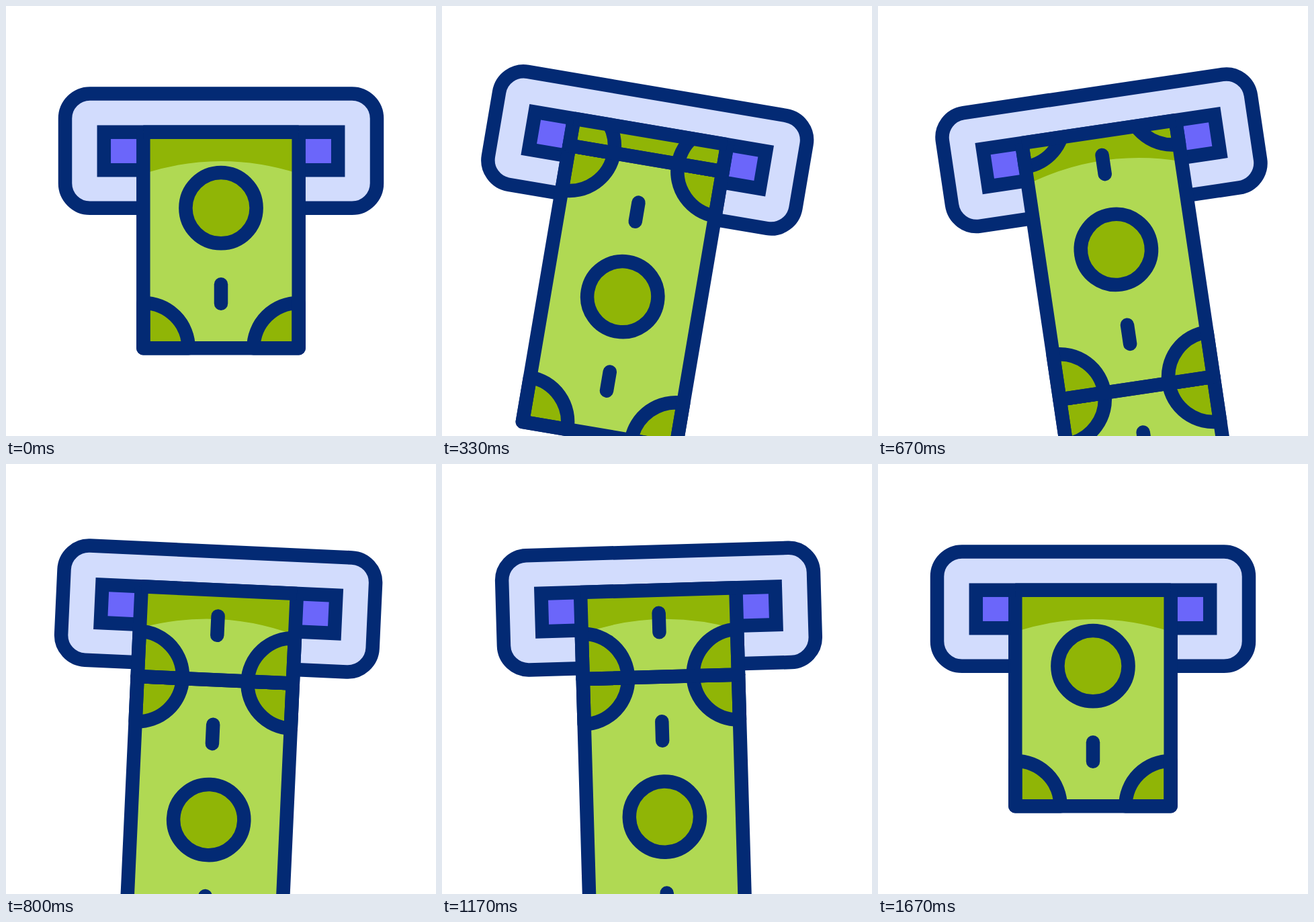
These frames come from a looping animation (640 px wide and 640 px high, 2 s). An HTML page:

```html
<!DOCTYPE html>
<html lang="en">
<head>
<meta charset="utf-8">
<title>Cash dispenser</title>
<style>
  html, body { margin: 0; width: 100%; height: 100%; overflow: hidden; background: #fff; }
  svg { display: block; width: 100vw; height: 100vh; }
  .line { stroke: #032a74; stroke-width: 20.5; stroke-linejoin: round; stroke-linecap: round; }
  .dark { fill: #90b506; }
</style>
</head>
<body>
<svg viewBox="0 0 640 640">
  <defs>
    <clipPath id="mouth"><rect x="180" y="187.5" width="280" height="2000"/></clipPath>
    <path id="corner" d="M-115.7 -67.3 A67.3 67.3 0 0 1 -48.4 0 H-115.7 Z"/>
    <!-- lower half of a bill, its bottom edge on y = 0 -->
    <g id="half" class="line dark">
      <use href="#corner"/>
      <use href="#corner" transform="scale(-1 1)"/>
      <path d="M0 -95 V-66.5"/>
    </g>
    <g id="bill">
      <use href="#half"/>
      <use href="#half" transform="translate(0 -417) scale(1 -1)"/>
      <circle class="line dark" cy="-208.5" r="52.6"/>
      <rect class="line" x="-115.7" y="-417" width="231.4" height="417" fill="none"/>
    </g>
  </defs>
  <g id="machine">
    <rect class="line" x="88" y="130.5" width="464" height="170.3" rx="37" fill="#d2dcfd"/>
    <rect class="line" x="145.8" y="187.7" width="348.4" height="56.5" fill="#6b66fa" style="stroke-linejoin: miter"/>
    <g clip-path="url(#mouth)">
      <rect id="paper" x="204.3" y="187.5" width="231.4" fill="#b0d953"/>
      <path class="dark" d="M204.3 187.5 H435.7 V249.5 Q320 212.5 204.3 249.5 Z"/>
      <g id="strip"></g>
    </g>
    <path class="line" d="M204.3 187.7 H435.7" style="stroke-linecap: butt"/>
  </g>
</svg>
<script>
  const byId = id => document.getElementById(id);
  const machine = byId('machine'), paper = byId('paper'), strip = byId('strip');

  const FPS = 30, LOOP = 2000, RESET = 50;
  const BILL = 417, BILLS = 4, REST = 509.2;
  const FEED_FRAMES = 47;
  // [frame, degrees]
  const SWING = [[0, 0], [9, 10], [19, -9], [26, 5], [33, -2], [40, 0]];

  for (let i = 0; i < BILLS; i++) {
    const bill = document.createElementNS('http://www.w3.org/2000/svg', 'use');
    bill.setAttribute('href', '#bill');
    bill.setAttribute('y', -i * BILL);
    strip.append(bill);
  }

  // cubic-bezier(a, 0, 1 - a, 1)
  function ease(x, a) {
    if (x <= 0) return 0;
    if (x >= 1) return 1;
    let lo = 0, hi = 1, s;
    for (let i = 0; i < 24; i++) {
      s = (lo + hi) / 2;
      const at = 3 * (1 - s) * s * ((1 - s) * a + s * (1 - a)) + s ** 3;
      if (at < x) lo = s; else hi = s;
    }
    return s * s * (3 - 2 * s);
  }

  function swing(frame) {
    const next = SWING.findIndex(key => key[0] > frame);
    if (next < 0) return 0;
    const [f0, from] = SWING[next - 1], [f1, to] = SWING[next];
    return from + (to - from) * ease((frame - f0) / (f1 - f0), 0.42);
  }

  function draw(ms) {
    const frame = Math.floor((ms % LOOP + 3.4) * FPS / 1000) % (LOOP * FPS / 1000);
    const feed = frame < RESET ? (BILLS - 1) * BILL * ease(frame / FEED_FRAMES, 0.36) : 0;
    const bottom = REST + feed;
    machine.setAttribute('transform', `rotate(${swing(frame)} 320 130.5)`);
    paper.setAttribute('height', bottom - 187.5);
    strip.setAttribute('transform', `translate(320 ${bottom})`);
  }

  const start = performance.now();
  function tick() {
    draw(performance.now() - start);
    requestAnimationFrame(tick);
  }
  tick();
</script>
</body>
</html>
```
